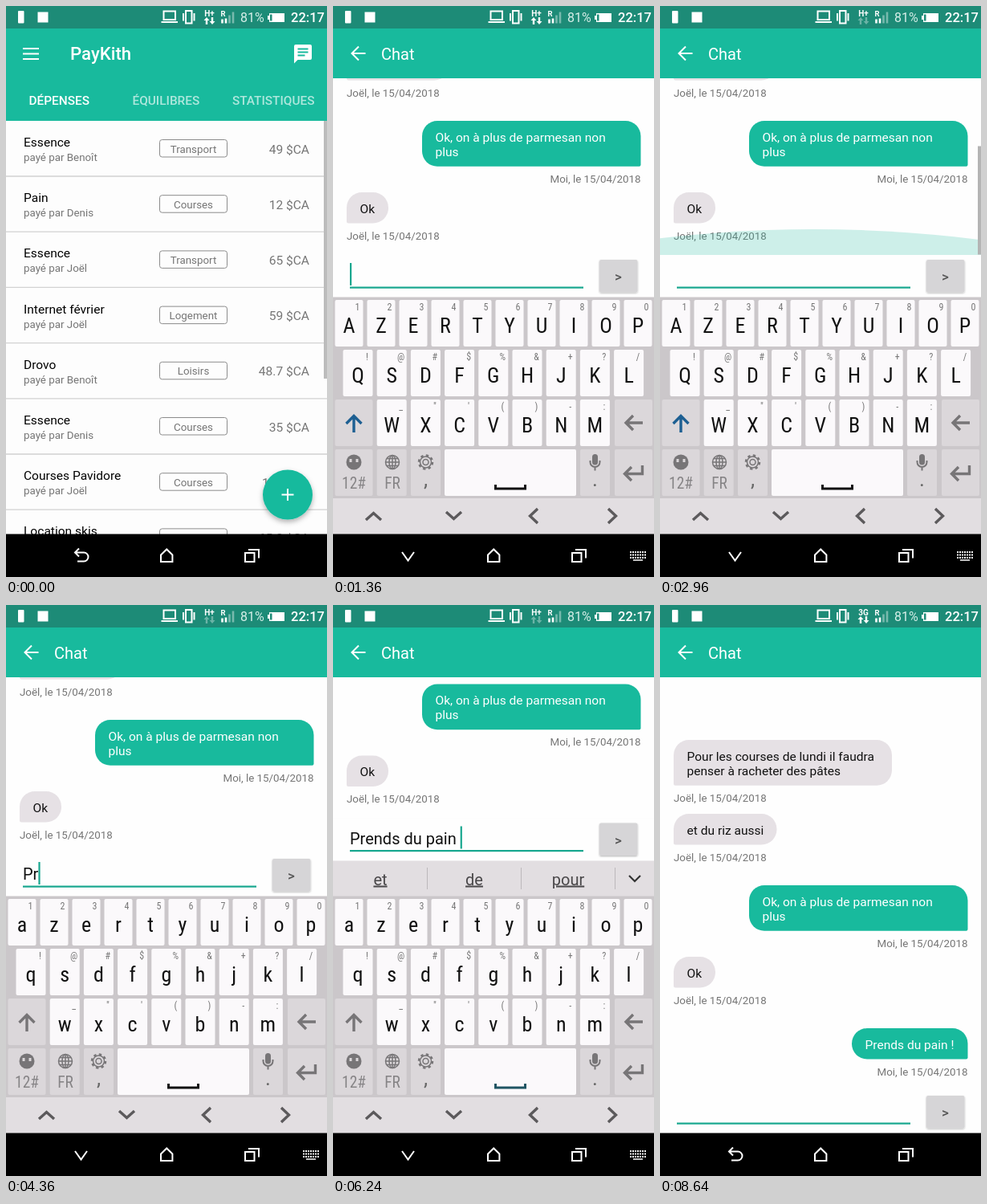
Animation of 400 by 711 pixels, one loop 9.71 s. Source, as an HTML page:

```html
<!DOCTYPE html>
<html lang="fr">
<head>
<meta charset="utf-8">
<title>Partage de frais</title>
<style>
  html, body { margin: 0; width: 100%; height: 100%; overflow: hidden; background: #fdfdfd; }
  svg { display: block; width: 100vw; height: 100vh; font-family: Roboto, "Noto Sans", sans-serif; }
  text { white-space: pre; }
  .body { font-size: 15.55px; }
  .small { font-size: 13.33px; fill: #757575; }
  .tab { font-size: 15.4px; font-weight: 500; fill: #fff; }
  .mid { text-anchor: middle; }
  .end { text-anchor: end; }
  .line { fill: none; stroke: #fff; stroke-width: 2; }
  .dark { fill: none; stroke: #5c5a5c; stroke-width: 3.4; }
  .func { fill: none; stroke: #777577; stroke-width: 3.4; }
  .glyph { font: 26px "Roboto Condensed", Roboto, sans-serif; text-anchor: middle; fill: #111; }
  .hint { font: 12px "Roboto Condensed", Roboto, sans-serif; text-anchor: middle; fill: #777; }
  .label { font: 19.5px "Roboto Condensed", Roboto, sans-serif; text-anchor: middle; fill: #868486; }
  .word { font-size: 20px; text-anchor: middle; fill: #4a484a; text-decoration: underline; }
</style>
</head>
<body>
<svg viewBox="0 0 400 711">
  <defs>
    <filter id="shadow" x="-30%" y="-30%" width="160%" height="170%">
      <feDropShadow dx="0" dy="3" stdDeviation="3" flood-opacity=".3"/>
    </filter>
    <filter id="lowShadow" x="-20%" y="-20%" width="140%" height="150%">
      <feDropShadow dx="0" dy="1" stdDeviation="1" flood-opacity=".3"/>
    </filter>
    <clipPath id="feedArea"><rect y="90" width="400" height="220"/></clipPath>
  </defs>

  <g id="expenses">
    <rect width="400" height="711" fill="#fdfdfd"/>
    <g id="rows"></g>
    <rect x="396" y="143" width="4" height="321" fill="#bcbcbc"/>
    <circle cx="351" cy="608.5" r="31" fill="#18ba9d" filter="url(#shadow)"/>
    <path class="line" d="M343.5 608.5h15M351 601v15"/>
    <rect y="28" width="400" height="115" fill="#18ba9d"/>
    <path class="line" d="M21 53h20M21 59.5h20M21 66h20"/>
    <text x="80" y="67" font-size="22.2" font-weight="500" fill="#fff">PayKith</text>
    <circle id="iconTap" cx="370" cy="59" fill="#fff"/>
    <path fill="#fff" d="M361 48h18q2 0 2 2v15q0 2-2 2h-15.500l-4.500 4.500v-21.500q0-2 2-2z"/>
    <path d="M363.500 53.500h13M363.500 57.500h13M363.500 61.500h9" stroke="#18ba9d" stroke-width="2"/>
    <text class="tab" x="28.500" y="122.500">DÉPENSES</text>
    <g opacity=".65">
      <text class="tab" x="157.500" y="122.500">ÉQUILIBRES</text>
      <text class="tab" x="282" y="122.500">STATISTIQUES</text>
    </g>
  </g>

  <g id="chat">
    <rect y="28" width="400" height="683" fill="#fefefe"/>
    <g id="feed"></g>
    <g clip-path="url(#feedArea)">
      <ellipse id="glow" cx="192" rx="600" ry="215" fill="#18ba9d" opacity=".21"/>
    </g>
    <rect id="scrollbar" x="396" width="4" height="135" fill="#b4b4b4"/>
    <g id="dock">
      <rect y="605" width="400" height="52" fill="#fefefe"/>
      <rect x="21" y="644.500" width="291" height="2.200" fill="#18a78f"/>
      <text id="draft" x="21" y="637" font-size="20" fill="#111"></text>
      <rect id="caret" y="615" width="2.200" height="28" fill="#18a78f"/>
      <rect x="332" y="611" width="47.500" height="40.500" rx="2" fill="#d6d5d7" filter="url(#lowShadow)"/>
      <circle id="sendTap" cx="356" cy="631.500" fill="#000" opacity=".1"/>
      <text class="mid" x="355.500" y="638" font-size="17" font-weight="500" fill="#555">&gt;</text>
    </g>
    <rect y="28" width="400" height="62" fill="#18ba9d"/>
    <path class="line" stroke-width="2.300" d="M40.500 59h-17M32 50.500l-8.500 8.500 8.500 8.500"/>
    <text x="60" y="67" font-size="20" fill="#fff">Chat</text>
  </g>

  <g id="keyboard">
    <g id="bar">
      <rect y="318.500" width="400" height="45" fill="#e2dee1"/>
      <g id="words">
        <text class="word" x="59" y="348.500"></text>
        <text class="word" x="176" y="348.500"></text>
        <text class="word" x="293" y="348.500"></text>
        <path d="M117.500 327v27M234.500 327v27M351.500 327v27" stroke="#bcb8bb"/>
        <path d="M369 337l7 7 7-7" fill="none" stroke="#333" stroke-width="2.200"/>
      </g>
    </g>
    <rect y="362.500" width="400" height="251" fill="#cbc7ca"/>
    <g id="layouts"></g>
    <rect y="613" width="400" height="45" fill="#e2dee1"/>
    <path class="dark" d="M41 640l9.500-8.500 9.500 8.500M141 630l9.500 8.500 9.500-8.500M255 626l-9.500 9 9.500 9M343 626l9.500 9-9.500 9"/>
  </g>

  <g id="nav">
    <rect y="657.500" width="400" height="54"/>
    <rect id="navTap" y="658" height="53" rx="26.500" fill="#2b2b2b"/>
    <path id="back" class="line" d="M91 675.500l-5 5 5 5M86 680.500h11a5.300 5.300 0 0 1 0 11h-8"/>
    <path class="line" d="M193 683.500l7.200-7 7.200 7v8.500h-14.400z"/>
    <path class="line" d="M298 681h11.500v11h-11.500zM302 677h13v10.500"/>
    <g id="imeNav">
      <path class="line" d="M86 680l7.500 10.500 7.500-10.500"/>
      <path d="M370 680h20M370 683.500h20M370 687h20" stroke="#fff" stroke-width="2.200" stroke-dasharray="2 1"/>
      <path d="M374 690h12" stroke="#fff" stroke-width="1.500"/>
    </g>
  </g>

  <g id="status">
    <rect width="400" height="28" fill="#1d8b77"/>
    <rect x="15" y="6" width="7.500" height="15.500" rx="1" fill="#fff"/>
    <rect x="39.500" y="7.500" width="13" height="13" fill="#fff"/>
    <path class="line" stroke-width="1.600" d="M196.500 6.500h14.500v10.500h-14.500zM193.500 20h20.500M224 6h7.500v15.500h-7.500zM221 9v9.500M234.500 9v9.500"/>
    <text id="network" class="mid" x="253.500" y="12.500" font-size="10" font-weight="700" fill="#fff"></text>
    <path id="traffic" fill="#fff" d="M250 14l3.500 4h-2.300v5h-2.400v-5h-2.300zM257 23l3.500-4h-2.300v-5h-2.400v5h-2.300z"/>
    <text x="267.500" y="13" font-size="9.500" font-weight="700" fill="#fff">R</text>
    <path d="M269.500 21.500v-5M274 21.500v-6" stroke="#fff" stroke-width="2.600"/>
    <path d="M278.500 21.500v-10M283 21.500v-14" stroke="#fff" stroke-width="2.600" opacity=".4"/>
    <text x="292" y="20" font-size="16" fill="#d9f0ea">81%</text>
    <path fill="#fff" d="M326 12h2v-3h19v11h-19v-3h-2z"/>
    <rect x="329" y="10.500" width="2.500" height="8" fill="#1d8b77"/>
    <text x="355" y="20" font-size="16.500" font-weight="500" fill="#fff">22:17</text>
  </g>
</svg>

<script>
const LOOP = 9710, TEAL = '#18ba9d', KEY = '#fbf9fb', FUNC = '#dbd7da', PRESSED = '#d0ccd0';
const $ = id => document.getElementById(id);
const clamp = v => Math.max(0, Math.min(1, v));
const ramp = (t, from, to) => clamp((t - from) / (to - from));
const easeOut = p => 1 - (1 - p) ** 3;
const smooth = p => p * p * (3 - 2 * p);
const show = (id, on) => { $(id).style.display = on ? '' : 'none'; };
const move = (id, y) => $(id).setAttribute('transform', `translate(0 ${y})`);
const put = (id, attrs) => { for (const k in attrs) $(id).setAttribute(k, attrs[k]); };
const escapeText = s => s.replace(/&/g, '&amp;').replace(/</g, '&lt;').replace(/"/g, '&quot;');
const text = (cls, x, y, s, extra = '') => `<text class="${cls}" x="${x}" y="${y}" ${extra}>${escapeText(s)}</text>`;

// Expense list
const expenses = [
  ['Essence', 'Benoît', 'Transport', '49'], ['Pain', 'Denis', 'Courses', '12'],
  ['Essence', 'Joël', 'Transport', '65'], ['Internet février', 'Joël', 'Logement', '59'],
  ['Drovo', 'Benoît', 'Loisirs', '48.7'], ['Essence', 'Denis', 'Courses', '35'],
  ['Courses Pavidore', 'Joël', 'Courses', '120'], ['Location skis', 'Joël', 'Loisirs', '65.2']
];
$('rows').innerHTML = expenses.map(([title, payer, tag, amount], i) =>
  `<g transform="translate(0 ${i * 69.2})">
    ${text('body', 22, 175, title)}${text('small', 22, 193, 'payé par ' + payer)}
    <rect x="191.5" y="166.5" width="84" height="21.500" rx="3" fill="none" stroke="#8c8c8c"/>
    ${text('small mid', 233.500, 182.500, tag)}
    ${text('body end', 378, 183.500, amount + ' $CA', 'fill="#757575"')}
    <path d="M0 212h400" stroke="#d2d2d2" stroke-width="1.300"/>
  </g>`).join('');

// Chat messages
function bubble(x, y, width, lines, mine) {
  const height = 38.5 + 18.3 * (lines.length - 1), r = 19;
  const right = x + width, bottom = y + height;
  const shape = `M${x + r} ${y}H${right - r}a${r} ${r} 0 0 1 ${r} ${r}` +
    (mine ? `V${bottom - 2}q0 2-2 2H${x + r}a${r} ${r} 0 0 1 ${-r} ${-r}`
          : `V${bottom - r}a${r} ${r} 0 0 1 ${-r} ${r}H${x + 2}q-2 0-2-2`) +
    `V${y + r}a${r} ${r} 0 0 1 ${r} ${-r}z`;
  const caption = (mine ? 'Moi' : 'Joël') + ', le 15/04/2018';
  return `<path d="${shape}" fill="${mine ? TEAL : '#e6e1e5'}"/>` +
    lines.map((s, i) => text('body', x + 16.5, y + 25.5 + 18.3 * i, s, `fill="${mine ? '#fff' : '#111'}"`)).join('') +
    text(mine ? 'small end' : 'small', mine ? 383.5 : 17, bottom + 20, caption);
}
$('feed').innerHTML =
  bubble(17, 257, 272, ['Pour les courses de lundi il faudra', 'penser à racheter des pâtes']) +
  bubble(17, 349, 128.5, ['et du riz aussi']) +
  bubble(111, 438, 272.5, ['Ok, on à plus de parmesan non', 'plus'], true) +
  bubble(17, 527, 52, ['Ok']) +
  `<g id="sent">${bubble(239, 616, 144.500, ['Prends du pain !'], true)}</g>`;

// Keyboard layouts
const rowTop = [366, 428, 490, 552], PITCH = 42.2;
const keyRect = (x, row, w, name, fill) =>
  `<rect data-key="${escapeText(name)}" data-fill="${fill}" x="${x}" y="${rowTop[row]}" width="${w}" height="58" rx="2" fill="${fill}"/>`;
function keyRow(chars, hints, row, firstX, pitch, w) {
  return [...chars].map((c, i) => {
    const x = firstX + i * pitch;
    return keyRect(x, row, w, c, KEY) + text('glyph', x + w / 2, rowTop[row] + 40.5, c) +
      (hints ? text('hint', x + w - 7, rowTop[row] + 13, hints[i]) : '');
  }).join('');
}
const edgeKeys = keyRect(351, 2, 47, 'del', FUNC) + keyRect(351, 3, 47, 'enter', FUNC) +
  '<path class="func" d="M386 519h-21M374 510l-9 9 9 9M385.500 572v10.500h-21M372 574l-8.500 8.500 8.500 8.500"/>';
const spaceMark = '<path class="space" d="M202.500 596v5h37v-5" fill="none" stroke="#111" stroke-width="3"/>';
const icons = `
  <circle cx="26" cy="568" r="9.500" fill="#777577"/>
  <path d="M22 564v4M30 564v4" stroke="${FUNC}" stroke-width="3"/>
  <g fill="none" stroke="#777577" stroke-width="1.500">
    <circle cx="74" cy="568" r="8.500"/><ellipse cx="74" cy="568" rx="4" ry="8.500"/>
    <path d="M65.500 568h17M67 563.500h14M67 572.500h14M74 559.500v17"/>
    <circle cx="115.500" cy="568" r="3.500"/><circle cx="115.500" cy="568" r="7"/>
    <circle cx="115.500" cy="568" r="8.500" stroke-width="2.500" stroke-dasharray="3.340 3.340"/>
    <path d="M320.500 566v2a6 6 0 0 0 12 0v-2M326.500 574v4.500" stroke-width="2"/>
  </g>
  <rect x="323" y="558" width="7" height="13.500" rx="3.500" fill="#777577"/>`;

function letters(upper) {
  const cased = s => upper ? s.toUpperCase() : s;
  return keyRow(cased('azertyuiop'), '1234567890', 0, 2.5, 40, 35) +
    keyRow(cased('qsdfghjkl'), '!@#$%&+?/', 1, 12.5, PITCH, 37) +
    keyRow(cased('wxcvbn') + cased('m'), '_"\'()-:', 2, 54.7, PITCH, 37) +
    keyRect(2.5, 2, 47, 'shift', FUNC) +
    `<path class="func" d="M26 531v-20M16.500 520l9.500-9.500 9.500 9.500" ${upper ? 'style="stroke:#1d5f92"' : ''}/>` +
    keyRect(2.5, 3, 47, '12#', FUNC) + keyRect(54.7, 3, 37, 'FR', FUNC) + keyRect(97, 3, 37, ',', FUNC) +
    keyRect(139, 3, 164, ' ', KEY) + keyRect(308, 3, 37, '.', FUNC) + icons +
    text('label', 26, 601, '12#') + text('label', 74, 601, 'FR') +
    text('glyph', 115.5, 598, ',', 'style="fill:#666"') + text('glyph', 326.5, 598, '.', 'style="fill:#666"') +
    spaceMark + edgeKeys;
}
const symbols = keyRow('1234567890', '', 0, 2.5, 40, 35) +
  keyRow('!@#$%&+?/', '', 1, 12.5, PITCH, 37) + keyRow('*_"\'()-:', '', 2, 12.5, PITCH, 37) +
  keyRect(2.5, 3, 47, 'ABC', FUNC) + keyRect(54.7, 3, 37, '1/2', FUNC) +
  text('label', 26, 588, 'ABC') + text('label', 73.5, 588, '1/2') +
  keyRow(';,', '', 3, 97, PITCH, 37) + keyRect(181.5, 3, 79, ' ', KEY) + spaceMark +
  keyRow('.=', '', 3, 266, PITCH, 37) + edgeKeys;
$('layouts').innerHTML =
  `<g id="upper">${letters(true)}</g><g id="lower">${letters(false)}</g><g id="symbols">${symbols}</g>`;
const keys = [...document.querySelectorAll('[data-key]')];
const wordSlots = [...document.querySelectorAll('.word')];

// Typing: time, text, pressed key, suggestions
const typing = [
  [0, '', '', ''],
  [4080, 'P', 'P', ''],
  [4280, 'Pr', 'r', ''],
  [4520, 'Pre', 'e', 'Prends Prendre Près'],
  [4680, 'Pren', 'n', 'Prends Prendre Prenez'],
  [5000, 'Prend', 'd', 'Prends Prend Prendre'],
  [5080, 'Prends', 's', 'Prends Prend Prendre'],
  [5160, 'Prends ', ' ', 'du le soin'],
  [5240, 'Prends d', 'd', 'du de des'],
  [5320, 'Prends du', 'u', 'du due dur'],
  [5440, 'Prends du ', ' ', 'monde nom projet'],
  [5560, 'Prends du p', 'p', 'pain plus projet'],
  [5680, 'Prends du pa', 'a', 'pain papier pays'],
  [5800, 'Prends du pai', 'i', 'pain paiement paire'],
  [5920, 'Prends du pain', 'n', 'pain pains paint'],
  [6120, 'Prends du pain ', ' ', 'et de pour'],
  [6360, 'Prends du pain ', '12#', 'et de pour'],
  [6420, 'Prends du pain ', '', ''],
  [6680, 'Prends du pain !', '!', ''],
  [8040, '', '', '']
];
const caretOn = [[840, 1480], [1960, 2080], [2440, 2680], [3160, 3440], [3720, 8520]];

function drawKeyboard(t, step) {
  const layout = t < 4080 ? 'upper' : t < 6420 ? 'lower' : 'symbols';
  for (const name of ['upper', 'lower', 'symbols']) show(name, name === layout);
  move('keyboard', 340 * (1 - easeOut(ramp(t, 960, 1200)) + smooth(ramp(t, 7200, 7400))));
  show('keyboard', t > 960 && t < 7400);
  show('bar', t >= 4520);
  show('words', step[3]);
  step[3].split(' ').forEach((w, i) => { wordSlots[i].textContent = w; });
  const held = typing.find(([ms, , key]) => key && t >= ms - 40 && t < ms + 60);
  for (const k of keys) k.setAttribute('fill', held && k.dataset.key === held[2] ? PRESSED : k.dataset.fill);
  for (const s of document.querySelectorAll('.space')) s.setAttribute('stroke', step[3] ? '#1f5563' : '#111');
}

function drawChat(t, step) {
  const enter = easeOut(ramp(t, 680, 860));
  $('chat').style.opacity = enter;
  move('chat', 50 * (1 - enter));
  show('chat', t > 680);
  const lift = t < 1160 || t >= 7240 ? 0 : t < 4520 ? 295 : 339.5;
  const scroll = 139 * (smooth(ramp(t, 1480, 1960)) - smooth(ramp(t, 2400, 2760)));
  move('feed', scroll - lift - 89 * easeOut(ramp(t, 8040, 8240)));
  move('dock', -lift);
  show('sent', t >= 8040);
  $('draft').textContent = step[1];
  put('caret', { x: 21 + $('draft').getComputedTextLength() });
  show('caret', caretOn.some(([a, b]) => t >= a && t < b));
  put('scrollbar', { y: 174.5 - 84.5 * scroll / 139, opacity: ramp(t, 1480, 1560) - ramp(t, 3400, 3560) });
  const pull = 32 * (easeOut(ramp(t, 2700, 2900)) - smooth(ramp(t, 2980, 3280)));
  put('glow', { cy: 525 - pull });
  show('glow', pull > 0.1);
  put('sendTap', { r: 24 * ramp(t, 7760, 7920), opacity: 0.12 * (1 - ramp(t, 7960, 8160)) });
}

function drawSystem(t) {
  put('iconTap', { r: 26 * easeOut(ramp(t, 500, 660)), opacity: 0.25 * (1 - ramp(t, 660, 800)) });
  const ime = t >= 960 && t < 7160;
  show('imeNav', ime);
  show('back', !ime);
  const half = 71 * easeOut(ramp(t, 7040, 7180));
  put('navTap', { x: 93.5 - half, width: 2 * half, opacity: 1 - ramp(t, 7220, 7480) });
  $('network').textContent = t < 8480 ? 'H+' : '3G';
  put('traffic', { opacity: t < 2000 || t >= 8000 ? 1 : 0.35 });
}

function frame(now) {
  const t = now % LOOP;
  const step = typing.filter(([ms]) => ms <= t).pop();
  drawChat(t, step);
  drawKeyboard(t, step);
  drawSystem(t);
}

let start;
function tick(now) {
  start ??= now;
  frame(now - start);
  requestAnimationFrame(tick);
}
frame(0);
requestAnimationFrame(tick);
</script>
</body>
</html>
```
